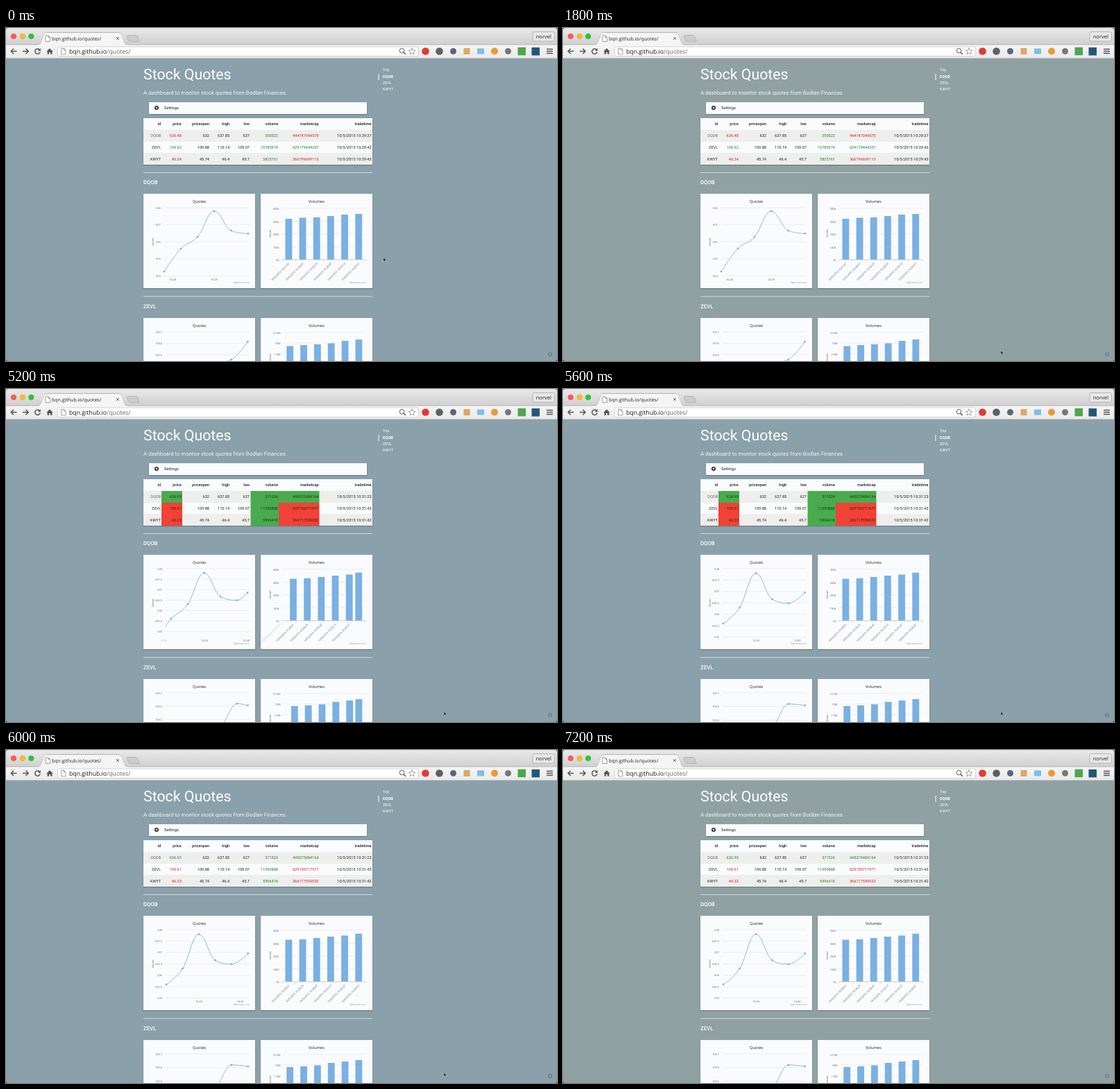
An HTML page that plays this animation: 794x480 px, repeating every 9.2 s.

```html
<!DOCTYPE html>
<html lang="en">
<head>
<meta charset="utf-8">
<title>Stock Quotes</title>
<style>
  html, body { margin: 0; width: 100%; height: 100%; overflow: hidden; background: #333; }
  svg { display: block; width: 794px; height: 480px; border-radius: 3px; }
  text { font-family: Roboto, sans-serif; text-rendering: geometricPrecision; }
  .ui { font-family: "Open Sans", "Noto Sans", sans-serif; }
  .bold { font-weight: 500; }
</style>
</head>
<body>
<svg id="stage" viewBox="0 0 794 480">
  <defs>
    <linearGradient id="bar" x2="0" y2="1"><stop stop-color="#e9e9e9"/><stop offset="1" stop-color="#d0d0d0"/></linearGradient>
    <linearGradient id="tool" x2="0" y2="1"><stop stop-color="#f5f5f5"/><stop offset="1" stop-color="#e9e9e9"/></linearGradient>
    <clipPath id="plot"><rect x="229" y="256" width="124" height="224"/></clipPath>
  </defs>
  <rect id="page" y="44" width="794" height="436"/>

  <!-- browser window -->
  <rect width="794" height="24" fill="url(#bar)"/>
  <g stroke-width=".5">
    <circle cx="11" cy="12" r="3.8" fill="#fb5a52" stroke="#dd4640"/>
    <circle cx="24" cy="12" r="3.8" fill="#fdb92d" stroke="#dc9d22"/>
    <circle cx="36.300" cy="12" r="3.8" fill="#29c63e" stroke="#20a631"/>
  </g>
  <rect y="24" width="794" height="20" fill="url(#tool)"/>
  <path d="M0 24H46C49 24 50 22 51 20L55 9Q56 6.500 59 6.500H162Q165 6.500 166 9L170 20Q171.500 24 175 24H794" fill="none" stroke="#aaa" stroke-width=".8"/>
  <path d="M46 24.500C49 24.500 50 22 51 20L55 9Q56 6.900 59 6.900H162Q165 6.900 166 9L170 20Q171.500 24.500 175 24.500Z" fill="#f5f5f5"/>
  <path d="M175 10.500H187Q189 10.500 190 13L192 19.500H179Q177 19.500 176 17L174 11.500Z" fill="#ccc" stroke="#aaa" stroke-width=".7"/>
  <path d="M0 43.700H794" stroke="#aaa" stroke-width=".7"/>
  <rect x="74.500" y="27" width="520" height="13.500" rx="2" fill="#fff" stroke="#c3c3c3" stroke-width=".7"/>
  <g fill="#fff" stroke="#888" stroke-width=".8">
    <path id="doc" d="M57 11H61L63.500 13.500V19.500H57ZM61 11V13.500H63.500"/>
    <use href="#doc" x="22.500" y="18.400"/>
  </g>
  <path d="M159 13L163 17M163 13L159 17" stroke="#666"/>
  <text class="ui" x="66" y="17.700" font-size="7" fill="#222">bqn.github.io/quotes/</text>
  <text class="ui" x="91" y="36.700" font-size="8.7" fill="#111">bqn.github.io<tspan fill="#666">/quotes/</tspan></text>
  <rect x="759" y="5.500" width="31.500" height="13.500" rx="2" fill="#e8e8e8" stroke="#aaa" stroke-width=".8"/>
  <text class="ui" x="774.800" y="14.900" font-size="7.5" text-anchor="middle" fill="#222">norvel</text>
  <g fill="none" stroke="#555" stroke-width="1.500">
    <path d="M15.500 33.500H7.500M11 29.800L7.300 33.500L11 37.200"/>
    <path d="M24 33.500H32M28.500 29.800L32.200 33.500L28.500 37.200"/>
    <path d="M48.300 31.200A3.700 3.700 0 1 0 49.200 34.300"/>
    <path d="M779 30.500H788M779 33.500H788M779 36.500H788"/>
    <circle cx="570.500" cy="32.700" r="3.300" stroke-width="1"/>
    <path d="M573 35.200L576 38"/>
    <path d="M585 28.600L586.300 32L590 32.200L587.100 34.500L588.100 38L585 36L581.900 38L582.900 34.500L580 32.200L583.700 32Z" stroke="#888" stroke-width=".8"/>
  </g>
  <path d="M49.800 29V33H45.800ZM58.300 34L63 29.200L67.700 34H66.400V37.800H64V35H62V37.800H59.600V34Z" fill="#555"/>
  <circle cx="604.500" cy="33.500" r="5.300" fill="#df3b32"/>
  <circle cx="624.500" cy="33.500" r="5.300" fill="#5c6164"/>
  <circle cx="644.500" cy="33.500" r="4.500" fill="#56677a"/>
  <rect x="659.500" y="29" width="9" height="9" fill="#dba865"/>
  <rect x="679" y="29.500" width="10" height="8" fill="#80bde4"/>
  <circle cx="704" cy="33.500" r="5" fill="#e89a36"/>
  <circle cx="723.500" cy="33.500" r="4.500" fill="#777"/>
  <rect x="737.500" y="27.800" width="11.500" height="11.500" fill="#4ea64c"/>
  <rect x="757.500" y="28" width="11.500" height="11.500" fill="#245777"/>

  <!-- page -->
  <g fill="#fff">
    <text x="198" y="73.500" font-size="21.300">Stock Quotes</text>
    <text x="198" y="95.500" font-size="7.740" opacity=".9">A dashboard to monitor stock quotes from Bodlan Finances.</text>
    <path d="M536.500 66H537.500V75H536.500Z"/>
    <g font-size="5.600">
      <text x="543" y="62">Top</text>
      <text x="543" y="71.500" font-weight="700">DQOB</text>
      <text x="543" y="80.800">ZEVL</text>
      <text x="543" y="90">KWYT</text>
    </g>
    <path d="M198 208H528V209H198ZM198 386.500H528V387.500H198Z" opacity=".6"/>
    <g class="bold" font-size="7.800">
      <text x="198" y="224.800">DQOB</text>
      <text x="198" y="403.600">ZEVL</text>
    </g>
  </g>
  <g id="cards"></g>
  <circle cx="217" cy="115" r="1.900" fill="none" stroke="#222" stroke-width="1.400"/>
  <circle cx="217" cy="115" r="2.900" fill="none" stroke="#222" stroke-width="1" stroke-dasharray="1.300 .978"/>
  <text x="228" y="117" font-size="5.750" fill="#222">Settings</text>
  <circle cx="784" cy="470" r="2.700" fill="none" stroke="#65777e" stroke-width=".9"/>
  <path d="M782.500 470H786" stroke="#65777e" stroke-width=".8"/>
  <g id="table"></g>
  <g id="charts"></g>
  <path id="cursor" d="M0 0V5.400L1.300 4.300L2.100 6.200L3 5.800L2.200 4H3.800Z" fill="#111" stroke="#ddd" stroke-width=".4"/>
</svg>
<script>
const $ = id => document.getElementById(id);
const LOOP = 9200;
const GREEN = '#21852f', RED = '#c8282b';

const rect = (x, y, w, h, fill) => `<rect x="${x}" y="${y}" width="${w}" height="${h}" fill="${fill}"/>`;
const text = (s, x, y, size, more = '') => `<text x="${x}" y="${y}" font-size="${size}" ${more}>${s}</text>`;
const label = (s, x, y, more = '') => text(s, x, y, 3.9, `class="ui" fill="#606060" ${more}`);
const grid = (x1, x2, y) => `<path d="M${x1} ${y}H${x2}" stroke="#e2e2e4" stroke-width=".6"/>`;
const card = (x, y, w, h) =>
  rect(x - .4, y + .8, w + .8, h + .4, 'rgba(0,0,0,.22)') + rect(x, y, w, h, '#fafbfd');

$('cards').innerHTML = card(206, 107, 314, 17) + card(198, 130, 330, 67) +
  [239, 418].map(y => card(198, y, 161, 136) + card(367, y, 161, 136)).join('');

// Table: right edges of the columns, and rows for the old and new quotes.
const EDGES = [223.2, 252.8, 293, 322.2, 351, 392, 450.7, 526.6];
const HEAD = 'id price priceopen high low volume marketcap tradetime'.split(' ');
const OLD = [
  ['DQOB', '636.48-', 632, 637.85, 627, '355522+', '444747044570-', '10/5/2015 10:29:37'],
  ['ZEVL', '109.62+', 109.88, 110.14, 109.07, '10785974+', '629179444207+', '10/5/2015 10:29:43'],
  ['KWYT', '46.34-', 45.74, 46.4, 45.7, '5825761+', '366796699113-', '10/5/2015 10:29:43']];
const NEW = [
  ['DQOB', '636.95+', 632, 637.85, 627, '371524+', '445075484164+', '10/5/2015 10:31:23'],
  ['ZEVL', '109.61-', 109.88, 110.14, 109.07, '11090888+', '629150717977-', '10/5/2015 10:31:43'],
  ['KWYT', '46.33-', 45.74, 46.4, 45.7, '5996418+', '366717559032-', '10/5/2015 10:31:42']];
const SPANS = { 1: [224, 30], 5: [352.5, 40.5], 6: [393, 58.5] };

function table(rows, flash) {
  let out = HEAD.map((s, i) => text(s, EDGES[i], 140, 5.6, 'class="bold" text-anchor="end" fill="#222"')).join('');
  const rowTop = r => Math.round(147 + r * 16.7);
  rows.forEach((row, r) => {
    const y = rowTop(r), h = rowTop(r + 1) - y;
    if (r != 1) out += rect(198, y, 330, h, '#eeeeec');
    row.forEach((v, c) => {
      const s = String(v), up = s.endsWith('+'), moved = up || s.endsWith('-');
      let fill = c || r ? '#222' : '#666';
      if (moved) fill = up ? GREEN : RED;
      if (moved && flash) {
        out += rect(SPANS[c][0], y, SPANS[c][1], h, up ? '#4aab4e' : '#f04236');
        fill = up ? '#143d18' : '#5a1512';
      }
      out += text(s.replace(/[+-]$/, ''), EDGES[c], 157.2 + r * 16.7, 5.6, `text-anchor="end" fill="${fill}"`);
    });
  });
  return out;
}

// Smooth path whose control points never overshoot their neighbours.
function spline(p) {
  let d = `M${p[0]}`, out = p[0];
  for (let i = 1; i < p.length; i++) {
    const [x, y] = p[i], a = p[i - 1], b = p[i + 1];
    let left = p[i], right = p[i];
    if (b) {
      const lx = (1.5 * x + a[0]) / 2.5, rx = (1.5 * x + b[0]) / 2.5;
      const slope = (b[1] - a[1]) / (b[0] - a[0]);
      const clamp = (v, n) => Math.max(Math.min(v, Math.max(n, y)), Math.min(n, y));
      let ly = clamp(y + slope * (lx - x), a[1]);
      const ry = clamp(y + (y - ly) * (rx - x) / (x - lx), b[1]);
      ly = y - (ry - y) * (x - lx) / (rx - x);
      left = [lx, ly];
      right = [rx, ry];
    }
    d += `C${out} ${left} ${x},${y}`;
    out = right;
  }
  return d;
}

const title = (s, x, top) => text(s, x, top + 13.2, 5.7, 'class="ui" text-anchor="middle" fill="#222"');
const axisName = (x, y) => label('Values', 0, 0, `text-anchor="middle" transform="translate(${x} ${y}) rotate(-90)"`);
const credit = (x, top) => text('Highcharts.com', x, top + 128.6, 3.2, 'class="ui" fill="#888" text-anchor="end"');

function lineChart(top, points, ticks, times, hidden) {
  const edge = ticks.some(([s]) => s % 1) ? 225 : 222.7;
  let out = title('Quotes', 278.7, top) + axisName(213, top + 69);
  ticks.forEach(([s, y]) => {
    out += grid(edge + 5, 351, y) + label(s, edge, y + 1.6, 'text-anchor="end"');
  });
  times.forEach(([s, x, o]) => out += label(s, x, top + 124.6, `text-anchor="middle" opacity="${o || 1}"`));
  out += `<path d="${spline(points)}" fill="none" stroke="#7cb5dc" stroke-width=".9" clip-path="url(#plot)"/>`;
  points.slice(hidden ? 1 : 0).forEach(([x, y]) => out += `<circle cx="${x}" cy="${y}" r="1.300" fill="#6fabd8"/>`);
  return out + credit(351, top);
}

// "k" counts 24 second steps
function stamp(k) {
  const s = 37 + 24 * k;
  return `10/5/2015 10:${27 + Math.floor(s / 60)}:${String(s % 60).padStart(2, '0')}`;
}

function barChart(top, left, tops, units, step, slide, first) {
  const base = top + 95, right = 518.3, gap = (right - left) / 6;
  const centre = k => left + (k + .5) * gap;
  let out = title('Volumes', 447.5, top) + axisName(381.5, top + 57);
  units.forEach((s, i) => {
    const y = top + 20.8 + i * step;
    out += grid(left, right, y) + label(s, left - 3.8, y + 2.4, 'text-anchor="end"');
  });
  tops.forEach((y, i) => {
    const k = slide ? i - 1 : i;
    out += rect(centre(i) + (i < 5 ? slide : 0) - 4.9, y, 9.8, base - y, '#7ab0e2');
    out += label(stamp(first + k), 0, 0, `text-anchor="end" opacity="${k < 0 ? .4 : 1}"
      transform="translate(${centre(k) + slide + 1.5} ${top + 101}) rotate(-45)"`);
  });
  out += `<path d="M${left} ${base}H${right}" stroke="#b8c6dc" stroke-width=".7"/>`;
  for (let i = 0; i < 7; i++) out += `<path d="M${left + i * gap} ${base}v3" stroke="#c0d0e0" stroke-width=".5"/>`;
  return out + credit(518, top);
}

const ticks = (from, by, y, gap, n) =>
  Array.from({ length: n }, (_, i) => [+(from - by * i).toFixed(1), y + gap * i]);

const CHARTS = {
  old: {
    quotes: [[228, 351], [252, 318], [276, 301], [300, 264], [324.500, 292], [348.800, 296.300]],
    ticks: ticks(638, 1, 259, 24.600, 5),
    times: [['10:28', 240], ['10:29', 300]],
    quotes2: [[276, 486], [300, 483], [324.500, 478], [348.500, 452]],
    ticks2: ticks(109.7, .1, 438, 16.500, 3),
    vol: [275, 273.500, 273, 271, 269, 268], vol2: [458.500, 457, 456, 454.500, 451, 449],
    slide: 0, first: 0
  },
  mid: {
    quotes: [[229.500, 343], [238, 331], [262, 310], [285.500, 265], [309, 299], [333, 304.500], [348, 293.500]],
    ticks: ticks(638, .5, 259, 15.100, 7),
    times: [['10:28', 227, .4], ['10:29', 286], ['10:30', 346]],
    quotes2: [[285, 492], [309, 486], [333, 453.500], [348.500, 456]],
    ticks2: ticks(109.7, .1, 438, 19, 3),
    slide: 6.6, first: 1, hidden: true
  },
  now: {
    quotes: [[231, 338], [254.500, 315], [278, 265.500], [301.500, 303], [325, 308.700], [348.700, 293.300]],
    ticks: ticks(638, .5, 259, 16.400, 7),
    times: [['10:29', 278], ['10:30', 337.5]],
    quotes2: [[278, 492], [301.500, 486], [325, 454], [348.700, 456]],
    ticks2: ticks(109.7, .1, 438, 19.700, 3),
    slide: 0, first: 1
  }
};
const NEW_VOL = [273.500, 272.800, 271, 269, 267.500, 264.700];
const NEW_VOL2 = [457, 456, 454.500, 451, 449, 447];

function charts(c) {
  return lineChart(239, c.quotes, c.ticks, c.times, c.hidden) +
    barChart(239, 397.3, c.vol || NEW_VOL, ['400k', '300k', '200k', '100k', '0k'], 18.5, c.slide, c.first) +
    lineChart(418, c.quotes2, c.ticks2, [], c.hidden) +
    barChart(418, 399.3, c.vol2 || NEW_VOL2, ['12.5M', '10M', '7.5M'], 15.2, c.slide, c.first);
}

// Each list holds [start, value...]; the last entry that has started applies.
const CURSOR = [[0, 544, 331], [200, 622, 455], [400, 630, 466.5], [600, 630.5, 466], [800, 631, 465], [7000, 616, 464], [7200, -20, -20]];
const PAGE = [[0, '#8aa0aa'], [1800, '#8fa1a3'], [5200, '#8aa0aa'], [7200, '#8fa1a3']];
const TABLE = [[0, OLD, false], [5200, NEW, true], [6000, NEW, false]];
const CHART = [[0, 'old'], [5200, 'mid'], [5400, 'now']];
const at = (list, t) => list.findLast(e => e[0] <= t);

let shownTable, shownChart;
function draw() {
  const t = performance.now() % LOOP;
  const [, x, y] = at(CURSOR, t), rows = at(TABLE, t), chart = at(CHART, t);
  $('cursor').setAttribute('transform', `translate(${x} ${y})`);
  $('page').setAttribute('fill', at(PAGE, t)[1]);
  if (rows != shownTable) $('table').innerHTML = table(rows[1], rows[2]);
  if (chart != shownChart) $('charts').innerHTML = charts(CHARTS[chart[1]]);
  shownTable = rows;
  shownChart = chart;
  requestAnimationFrame(draw);
}
draw();
</script>
</body>
</html>
```
